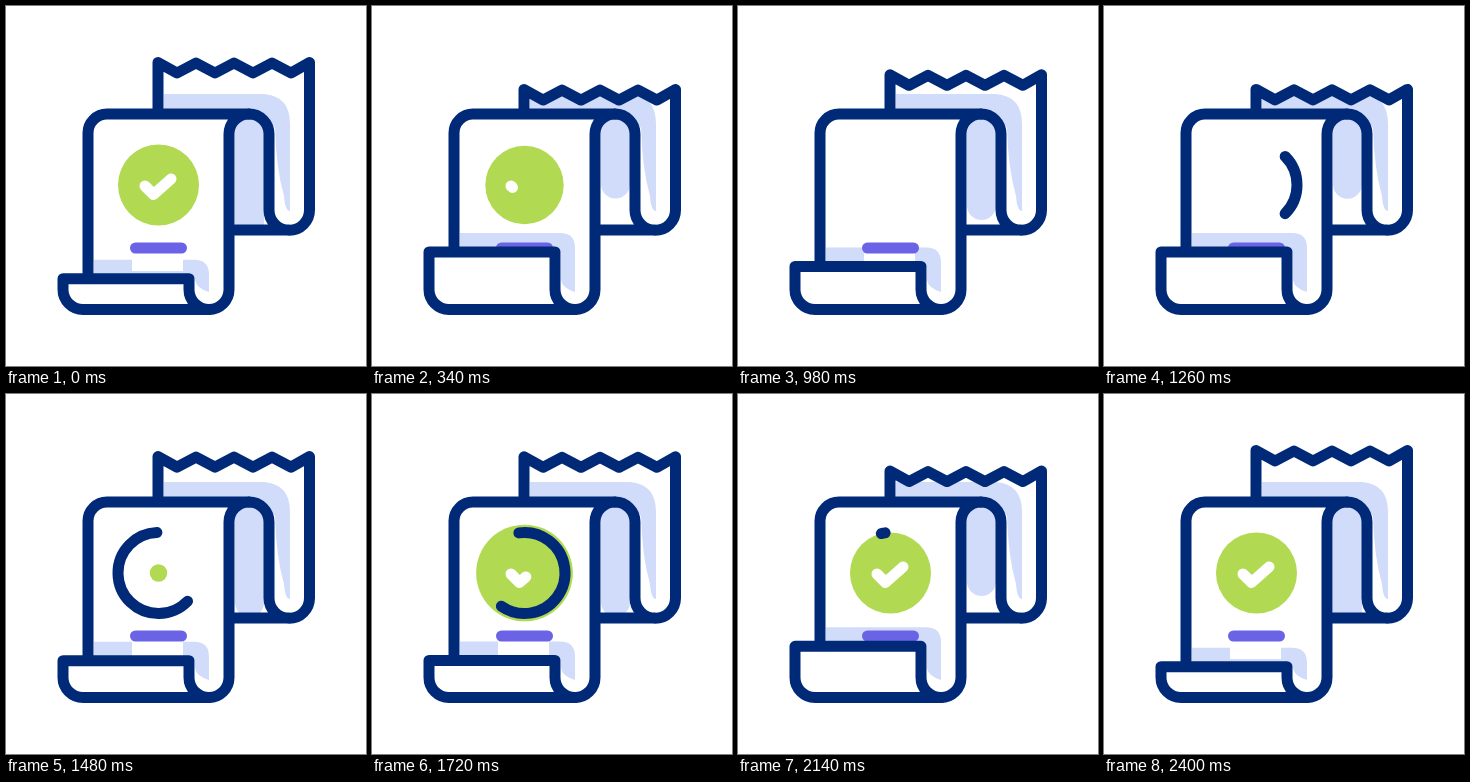
Write an HTML page that moves like this. It is 360x360 px and loops after 2.42 s.

```html
<!DOCTYPE html>
<html lang="en">
<head>
<meta charset="utf-8">
<title>Receipt</title>
<style>
  html, body { margin: 0; width: 100%; height: 100%; overflow: hidden; background: #fff; }
  svg { display: block; width: 100vw; height: 100vh; }
  .line { fill: none; stroke: #002a77; stroke-width: 11; stroke-linecap: round; stroke-linejoin: round; }
  .paper { fill: #fff; }
  .shade { fill: #d1dcfb; }
</style>
</head>
<body>
<svg viewBox="0 0 360 360">
  <defs>
    <clipPath id="sheet"><path id="sheetEdge" d="M152 225V56.5L171 67 190 57 209 67 228 57 247 67 266 57 285 67 303.500 56.500V225z"/></clipPath>
    <clipPath id="tube"><path d="M223 224V128a20 20 0 0 1 40 0V224z"/></clipPath>
  </defs>

  <!-- back sheet -->
  <g clip-path="url(#sheet)">
    <path class="shade" d="M158 88H258Q284 90 284 118V205Q279 205 278 190Q270 162 269 122L250 104H158z"/>
  </g>
  <path id="teeth" class="line" d="M152 130V56.5L171 67 190 57 209 67 228 57 247 67 266 57 285 67 303.500 56.500V130"/>
  <path class="paper" d="M223 224V128a20 20 0 0 1 40 0V224z"/>
  <g clip-path="url(#tube)">
    <rect id="tubeShade" class="shade" x="229" y="113" width="29" height="110" rx="14.500"/>
  </g>
  <path class="line" d="M243 108a20 20 0 0 1 20 20V204a20 20 0 0 0 40.500 0V110M228 224H283"/>

  <!-- front sheet -->
  <path class="line" style="fill:#fff" d="M82 290V127a19 19 0 0 1 19-19H243a20 20 0 0 0-20 20V283.500a20 20 0 0 1-20 20"/>
  <path id="curlShade" class="shade"/>
  <path class="paper" d="M126 247h51v18h-51z"/>
  <rect x="124" y="236.500" width="57" height="11" rx="5.500" fill="#6a63e6"/>

  <!-- badge -->
  <circle id="disc" cx="152.500" cy="179" r="40.500" fill="#b1d951"/>
  <path id="tick" class="line" style="stroke:#fff" pathLength="1" d="M139 180l8.500 8.500L165 173"/>
  <circle id="arc" class="line" cx="152.500" cy="179" r="40.500" pathLength="360"/>

  <path id="curl" class="line" style="fill:#fff"/>
</svg>
<script>
  const LOOP = 2420, SWING = 400;
  const el = id => document.getElementById(id);
  const [sheetEdge, teeth, tubeShade, curlShade, disc, tick, arc, curl] =
    ['sheetEdge', 'teeth', 'tubeShade', 'curlShade', 'disc', 'tick', 'arc', 'curl'].map(el);

  // Eased progress from 0 to 1 between two times
  const ease = (t, from, to) => {
    const x = Math.min(1, Math.max(0, (t - from) / (to - from)));
    return x * x * (3 - 2 * x);
  };
  const set = (node, attrs) => {
    for (const name in attrs) node.setAttribute(name, attrs[name]);
  };
  const show = (node, on) => set(node, { visibility: on ? 'visible' : 'hidden' });

  function drawPaper(t) {
    const phase = Math.min(t, 2400) % (2 * SWING);
    const k = ease(SWING - Math.abs(phase - SWING), 0, SWING);
    const shift = { transform: `translate(0 ${28.7 * k})` };
    set(sheetEdge, shift);
    set(teeth, shift);
    set(tubeShade, { height: 119 - 42 * k });

    const y = 272.7 - 28.5 * k;
    set(curl, { d: `M203 303.5H77a20 20 0 0 1-20-20V${y}H183V283.5a20 20 0 0 0 20 20z` });
    set(curlShade, { d: `M88 ${y - 19}H188q15 0 15 15V286Q190 282 189 274V${y}H88z` });
  }

  function drawBadge(t) {
    const scale = t < 1000
      ? 1 - ease(t, 300, 680)
      : 1.2 * ease(t, 1400, 1700) - 0.2 * ease(t, 1700, 1900);
    set(disc, { r: 40.5 * scale });

    const drawn = t < 1000 ? 1 - ease(t, 0, SWING) : ease(t, 1500, 1900);
    set(tick, { 'stroke-dasharray': `${drawn} 2` });
    show(tick, drawn > 0.001);

    const head = 360 * ease(t, 1000, 1800);
    const tail = 360 * ease(t, 1400, 2200);
    const turn = 360 * ease(t, 980, 2250) - 90;
    set(arc, {
      'stroke-dasharray': `${head - tail} 720`,
      transform: `rotate(${turn + tail} 152.5 179)`
    });
    show(arc, head - tail > 0.01);
  }

  function frame() {
    const t = performance.now() % LOOP;
    drawPaper(t);
    drawBadge(t);
    requestAnimationFrame(frame);
  }
  frame();
</script>
</body>
</html>
```
